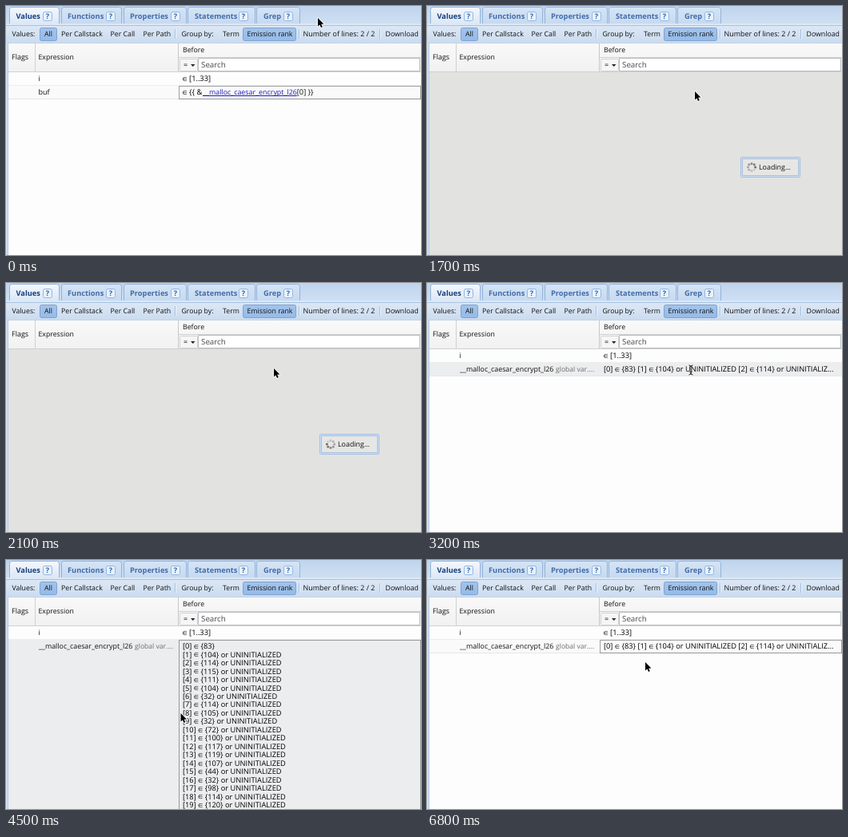
An HTML page with a canvas for the animation above (7 s loop, 519 by 312 pixels).

```html
<!DOCTYPE html>
<html lang="en">
<head>
<meta charset="utf-8">
<title>Values panel</title>
<style>
  html, body { margin: 0; width: 100%; height: 100%; overflow: hidden; background: #fff; }
  canvas { display: block; width: 519px; height: 312px; }
</style>
</head>
<body>
<canvas id="stage" width="519" height="312"></canvas>
<script>
const W = 519, H = 312, LOOP = 7000, STEP = 100;
const LOAD = 1700, READY = 2200, OPEN = 3500, CLOSE = 6000;
const ROW1 = 83, ROW2 = 100, ROW_END = 117, COL = 216;
const VALUE_X = 221, VALUE_SIZE = 9.27;
const ctx = document.getElementById('stage').getContext('2d');
ctx.textRendering = 'geometricPrecision';

const bytes = [83, 104, 114, 115, 111, 104, 32, 114, 105, 32,
               72, 100, 117, 119, 107, 44, 32, 98, 114, 120];
const entries = bytes.map((b, i) => `[${i}] ∈ {${b}}${i ? ' or UNINITIALIZED' : ''}`);
const summary = entries.slice(0, 3).join(' ').slice(0, -2) + '...';

// Pointer path: time, x, y
const path = [
  [0, 390, 15], [800, 339, 98], [1000, 337, 101], [1100, 337, 124],
  [1300, 335, 107], [2100, 335, 107], [2200, 330, 109], [3500, 330, 109],
  [4000, 228, 113], [4500, 218.5, 192], [5000, 222, 288], [5200, 224, 290],
  [5800, 261, 110], [6200, 261, 110], [6500, 262, 112], [6800, 273, 128], [LOOP, 273, 128]
];

function pointerAt(t) {
  const i = path.findIndex(k => k[0] > t);
  const [t0, x0, y0] = path[i - 1], [t1, x1, y1] = path[i];
  const u = (t - t0) / (t1 - t0), e = u * u * (3 - 2 * u);
  return { x: x0 + (x1 - x0) * e, y: y0 + (y1 - y0) * e };
}

function box(x, y, w, h, fill) {
  ctx.fillStyle = fill;
  ctx.fillRect(x, y, w, h);
}

function fade(y0, y1, top, bottom) {
  const g = ctx.createLinearGradient(0, y0, 0, y1);
  g.addColorStop(0, top);
  g.addColorStop(1, bottom);
  return g;
}

function panel(x, y, w, h, r, fill, line) {
  ctx.beginPath();
  ctx.roundRect(x + .5, y + .5, w - 1, h - 1, r);
  ctx.fillStyle = fill;
  ctx.fill();
  ctx.strokeStyle = line;
  ctx.lineWidth = 1;
  ctx.stroke();
}

// Draws text centred vertically on y and returns its right edge
function label(str, x, y, size = 8.75, color = '#111', weight = 400) {
  ctx.font = `${weight} ${size}px "Open Sans", "Noto Sans", sans-serif`;
  ctx.fillStyle = color;
  ctx.fillText(str, x, y + 3.2);
  return x + ctx.measureText(str).width;
}

function value(str, x, y) {
  str.split('∈').forEach((part, i) => {
    if (i) {
      ctx.font = '7.1px "DejaVu Sans", sans-serif';
      ctx.fillStyle = '#000';
      ctx.fillText('∈', x, y + 3);
      x += ctx.measureText('∈').width;
    }
    x = label(part, x, y, VALUE_SIZE, '#000');
  });
}

function tab(name, x, w, textX, helpX, active) {
  ctx.beginPath();
  ctx.roundRect(x + .5, 1.5, w - 1, 21, [3, 3, 0, 0]);
  ctx.fillStyle = active ? fade(2, 22, '#f3f7fd', '#dce8f6') : fade(2, 22, '#d5e4f5', '#c6daf1');
  ctx.fill();
  ctx.strokeStyle = '#93b3da';
  ctx.lineWidth = 1;
  ctx.stroke();
  label(name, textX, 13, 9.25, active ? '#173f7d' : '#426ca8', 700);
  panel(helpX, 7, 12, 12, 2, '#e9f1fb', '#93b5df');
  label('?', helpX + 3.7, 13, 9, '#2e68b5', 700);
}

function separator(x) {
  box(x, 29, 1, 12, '#a3bfdf');
  box(x + 1, 29, 1, 12, '#eef5fc');
}

function pressed(x, w) {
  panel(x, 27, w, 17, 2, fade(27, 44, '#a3c3ea', '#95bbe9'), '#7fa3d0');
}

function chrome() {
  box(0, 0, W, 25, fade(0, 24, '#bfd4ed', '#d0e0f3'));
  tab('Values', 4, 63, 12.5, 46, true);
  tab('Functions', 69, 76, 77, 125);
  tab('Properties', 147, 79, 155, 206);
  tab('Statements', 227, 85, 236, 291);
  tab('Grep', 313, 55, 322, 347);
  box(0, 22, W, 3, '#dce8f6');
  box(0, 24, W, 1, '#a9c3e2');
  box(0, 25, W, 21, fade(25, 46, '#dce7f5', '#cbdcf0'));
  pressed(42, 22);
  pressed(296, 67);
  [['Values:', 7.5], ['All', 48], ['Per Callstack', 69], ['Per Call', 130.5],
   ['Per Path', 171.5], ['Group by:', 219.5], ['Term', 271], ['Emission rank', 301.5],
   ['Download', 474.5]].forEach(([s, x]) => label(s, x, 35));
  label('Number of lines: 2 / 2', 371.5, 35, 8.95);
  [211, 366, 467].forEach(separator);
  box(0, 46, 3, H - 46, '#d3e0f2');
  box(2, 46, 1, H - 46, '#b4cae6');
}

function header() {
  box(3, 46, W - 3, 37, fade(46, 83, '#f9f9f9', '#f1f1f1'));
  box(3, 46, W - 3, 1, '#c3d3e6');
  box(3, 82, W - 3, 1, '#d0d0d0');
  box(36, 47, 1, 35, '#d0d0d0');
  box(215, 47, 1, 35, '#c8c8c8');
  box(216, 64, W - 216, 1, '#d0d0d0');
  label('Flags', 7, 64, 9);
  label('Expression', 40.5, 64);
  label('Before', 221, 55);
  panel(217, 66, 23, 16, 1, '#f6f6f6', '#d2d2d2');
  label('=', 222, 74, 9);
  ctx.beginPath();
  ctx.moveTo(231, 73);
  ctx.lineTo(236.5, 73);
  ctx.lineTo(233.75, 76);
  ctx.fillStyle = '#222';
  ctx.fill();
  panel(240, 65, 278, 17, 0, '#fff', '#b8bcc2');
  label('Search', 244, 74, 9.8, '#4a4a4a');
}

function rows(t, pointer) {
  const open = t >= OPEN && t < CLOSE, loaded = t >= READY;
  const end = open ? H + 20 : ROW_END;
  const hover = pointer.y >= ROW2 && pointer.y < end;
  box(3, ROW1, W - 3, H - ROW1, '#fdfdfd');
  box(3, ROW2, W - 3, end - ROW2, hover || open ? '#ecedef' : '#fafafa');
  box(3, ROW2 - 1, W - 3, 1, '#ededed');
  box(3, end - 1, W - 3, 1, '#e6e6e6');

  label('i', 40.5, 91, 9);
  value('∈ [1..33]', VALUE_X - .5, 91);

  if (loaded) {
    label('__malloc_caesar_encrypt_l26', 41, 108, 8.85);
    label('global var....', 161, 108, 8.6, '#6c6c6c');
  } else {
    label('buf', 40.5, 108, 9);
  }

  if (open) {
    entries.forEach((s, i) => value(s, VALUE_X, 108 + i * 10.47));
  } else if (loaded) {
    value(summary, VALUE_X, 108);
  } else {
    value('∈ {{ &', VALUE_X - .5, 108);
    const right = label('__malloc_caesar_encrypt_l26', 246, 108, 8.9, '#1c1cb8');
    box(246, 112, right - 246, 1, '#1c1cb8');
    label('[0] }}', right, 108, VALUE_SIZE);
  }

  if (!loaded || t >= OPEN) {
    ctx.setLineDash([1, 1]);
    ctx.strokeStyle = '#444';
    ctx.lineWidth = 1;
    ctx.strokeRect(COL + .5, ROW2 + .5, W - COL - 1, end - ROW2 - 1);
    ctx.setLineDash([]);
  }
}

function loading(t) {
  box(3, ROW1, W - 3, H - ROW1, '#e2e2e0');
  panel(392, 189, 75, 26, 1, '#cfdef0', '#a3c0e6');
  panel(394, 191, 71, 22, 0, '#e6e6e5', '#a9bfdc');
  const turn = Math.floor(t / STEP);
  for (let i = 0; i < 8; i++) {
    const a = (i + turn) * Math.PI / 4, tone = 205 - i * 14;
    ctx.beginPath();
    ctx.arc(406 + 4.6 * Math.cos(a), 202 + 4.6 * Math.sin(a), 1.5, 0, 2 * Math.PI);
    ctx.fillStyle = `rgb(${tone},${tone},${tone})`;
    ctx.fill();
  }
  label('Loading...', 415, 202, 8.9);
}

function arrow(x, y) {
  const points = [[0, 0], [0, 10.5], [2.4, 8.4], [4, 12], [5.8, 11.2], [4.2, 7.7], [7.4, 7.4]];
  ctx.beginPath();
  points.forEach(([dx, dy]) => ctx.lineTo(x + dx, y + dy));
  ctx.closePath();
  ctx.lineJoin = 'round';
  ctx.lineWidth = 1.6;
  ctx.strokeStyle = '#fff';
  ctx.stroke();
  ctx.fillStyle = '#000';
  ctx.fill();
}

function beam(x, y) {
  ctx.beginPath();
  for (const s of [-1, 1]) {
    ctx.moveTo(x - 2.5, y + s * 6);
    ctx.quadraticCurveTo(x, y + s * 6, x, y + s * 4);
    ctx.quadraticCurveTo(x, y + s * 6, x + 2.5, y + s * 6);
  }
  ctx.moveTo(x, y - 5);
  ctx.lineTo(x, y + 5);
  ctx.moveTo(x - 1.5, y + 2.5);
  ctx.lineTo(x + 1.5, y + 2.5);
  ctx.lineWidth = 2.2;
  ctx.strokeStyle = 'rgba(255,255,255,.7)';
  ctx.stroke();
  ctx.lineWidth = 1;
  ctx.strokeStyle = '#111';
  ctx.stroke();
}

function draw(t) {
  const p = pointerAt(t);
  chrome();
  header();
  if (t >= LOAD && t < READY) loading(t);
  else rows(t, p);
  const overText = t >= READY && p.x > 221 && p.y < (t >= OPEN && t < CLOSE ? H : ROW_END);
  (overText ? beam : arrow)(p.x, p.y);
}

function tick() {
  const t = performance.now() % LOOP;
  draw(Math.floor(t / STEP) * STEP);
  requestAnimationFrame(tick);
}
tick();
</script>
</body>
</html>
```
